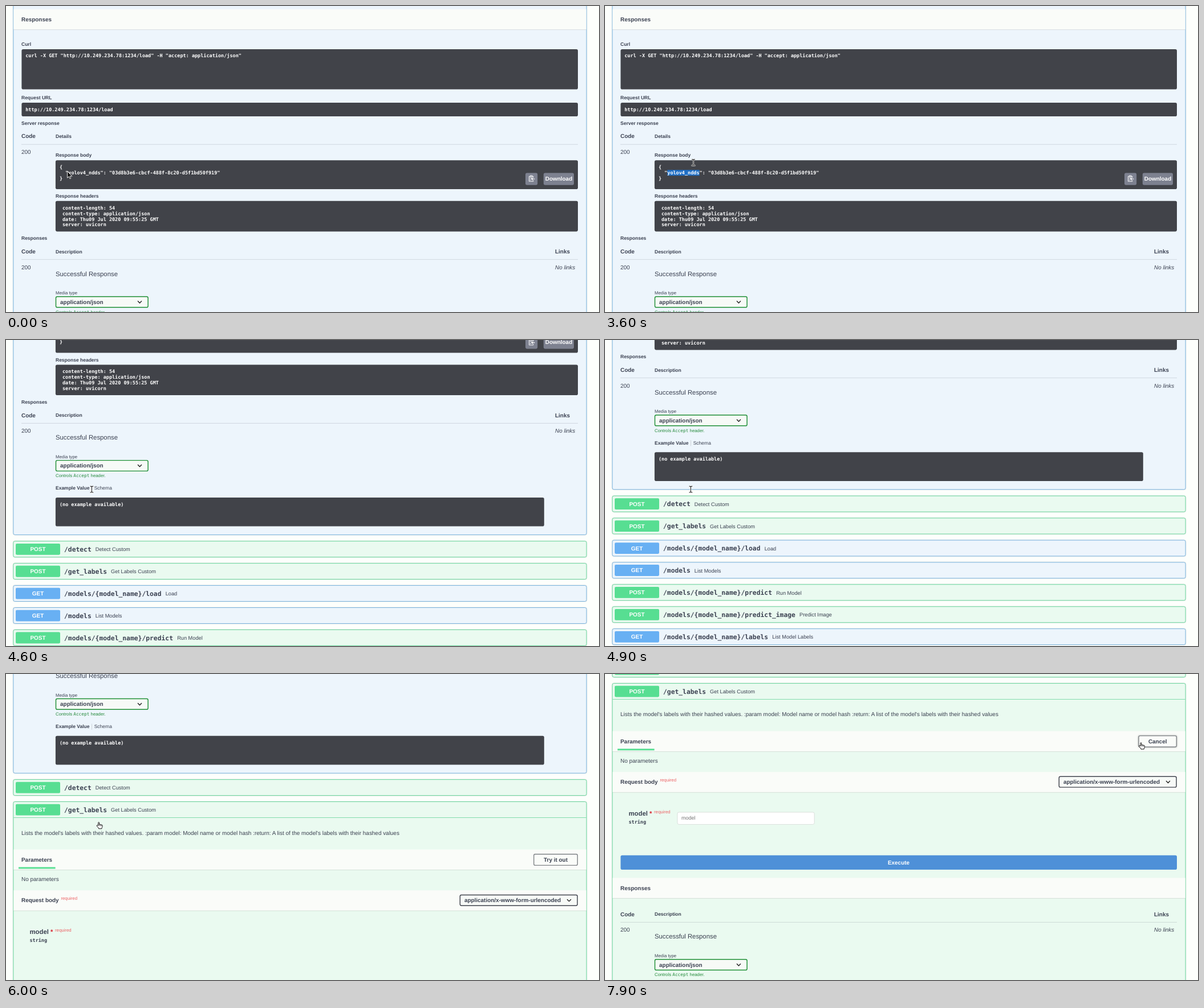
An HTML page that plays this animation: 1040x538 px, repeating every 8000 ms.

```html
<!DOCTYPE html>
<html lang="en">
<head>
<meta charset="utf-8">
<title>API docs</title>
<style>
html, body { margin: 0; width: 100%; height: 100%; overflow: hidden; background: #fdfffc; }
svg { display: block; width: 1040px; height: 538px; }
text { font-family: "Liberation Sans", Arial, sans-serif; fill: #3b4151; text-rendering: geometricPrecision; white-space: pre; }
.b { font-weight: 700; }
.i { font-style: italic; }
.m { font-family: "DejaVu Sans Mono", monospace; font-weight: 700; }
.thin { font-weight: 400; }
.w { fill: #fff; }
.g { fill: #24893a; }
.r { fill: #ec6265; }
.mid { text-anchor: middle; }
.lift { filter: drop-shadow(0 0 1.6px rgba(0,0,0,.35)); }
</style>
</head>
<body>
<svg id="stage" viewBox="0 0 1040 538"></svg>
<script>
const LOOP = 8000, STEP = 100;
const S = 8.51, M = 9.93, L = 11.34;      // text sizes
const ADV = S * 0.602;                     // width of one code character
const DARK = '#414349', INK = '#41444e';
const GET = { name: 'GET', solid: '#68b0f3', line: '#78b3de', fill: '#edf5fc' };
const POST = { name: 'POST', solid: '#57de92', line: '#68d59c', fill: '#eafaf0' };

const text = (x, y, size, cls, str) =>
  `<text x="${x}" y="${y}" font-size="${size}" class="${cls}">${str}</text>`;
const rect = (x, y, x2, y2, fill, r = 0, extra = '') =>
  `<rect x="${x}" y="${y}" width="${x2 - x}" height="${y2 - y}" rx="${r}" fill="${fill}" ${extra}/>`;
const group = (id, body, extra = '') => `<g id="${id}" ${extra}>${body}</g>`;
const path = (d, stroke, width, fill = 'none') =>
  `<path d="${d}" fill="${fill}" stroke="${stroke}" stroke-width="${width}" stroke-linejoin="round" stroke-linecap="round"/>`;
const code = (x, y, x2, y2) => rect(x, y, x2, y2, DARK, 2.8);
const label = (x, y, str) => text(x, y, S, 'b', str);
const title = (x, y, str) => text(x, y, M, 'b', str);
const mono = (x, y, str) => text(x, y, S, 'm w', str);
const rule = y => rect(27, y - 0.35, 1003, y + 0.4, 'rgba(59,65,81,.22)');

const block = (kind, y, y2) =>
  rect(12.9, y, 1018.1, y2, 'none', 2.8, 'stroke="#000" stroke-opacity=".07" stroke-width="2.6"') +
  rect(12.9, y, 1018.1, y2, kind.fill, 2.8, `stroke="${kind.line}" stroke-width="1"`);

const band = y =>
  rect(13.4, y, 1017.6, y + 35.7, '#fafcf9') +
  rect(13.4, y + 35.5, 1017.6, y + 36.4, 'rgba(0,0,0,.12)');

const button = (x, y, x2, str, cls = '') =>
  `<g class="${cls}">${rect(x, y, x2, y + 19.6, '#fafcf9', 2.4, 'stroke="#808488" stroke-width="1.4"')}</g>` +
  text((x + x2) / 2, y + 13.4, M, 'b mid', str);

const select = (x, y, x2, str, color) =>
  rect(x + 0.7, y + 0.7, x2 - 0.7, y + 19.5, '#f7faf7', 2.4, `stroke="${color}" stroke-width="1.45"`) +
  title(x + 8.3, y + 13.6, str) +
  path(`M${x2 - 18.4} ${y + 8.7} l3.1 3.2 l3.1 -3.2`, '#222', 1.4);

function row(kind, y, route, note, height = 28) {
  const noteX = 102 + route.length * L * 0.602 + 7;
  return block(kind, y, y + height) +
    rect(17, y + 4.2, 95, y + 24, kind.solid, 2.1) +
    text(56, y + 17.6, M, 'b w mid', kind.name) +
    text(102, y + 18.2, L, 'm', route) +
    text(noteX, y + 17.7, 9.22, '', note);
}

// Table of documented responses; y is the baseline of its heading
const responseTable = y =>
  title(27, y, 'Code') + label(87, y - 0.5, 'Description') + title(963, y, 'Links') +
  rule(y + 10.7) +
  text(27, y + 27.5, M, '', '200') + text(963, y + 27.5, M, 'i', 'No links') +
  text(87, y + 39.6, L, '', 'Successful Response') +
  text(87, y + 72, 7.8, '', 'Media type') +
  select(86.8, y + 75.3, 249.8, 'application/json', '#1f8f35') +
  text(87, y + 105.7, 7.8, 'g', 'Controls <tspan class="m thin g">Accept</tspan> header.');

const clipboardIcon =
  path('M920 299.5h-2.6v8.8h7.4v-1.6 M924.8 301.5v-2h-2.4 M919.4 299.8v-1.6h3.6v1.6z M918.8 302.4h3 M918.8 305.8h1.8', '#fff', 0.95) +
  path('M927 304h-5 M923.6 302.2l-1.8 1.8l1.8 1.8', '#fff', 1.1);

const loadBlock =
  block(GET, -60, 641.8) + band(5.7) + title(27, 27, 'Responses') +
  label(27, 70.3, 'Curl') + code(27.4, 76, 1003, 146.6) +
  mono(34.2, 90, 'curl -X GET "http://10.249.234.78:1234/load" -H "accept: application/json"') +
  label(27, 164.4, 'Request URL') + code(27.4, 170, 1003, 194) +
  mono(34.2, 185, 'http://10.249.234.78:1234/load') +
  label(27, 208.8, 'Server response') +
  title(27, 232.3, 'Code') + label(87, 231.7, 'Details') + rule(243.2) +
  text(27, 260, M, '', '200') + label(87, 265.4, 'Response body') +
  code(86.9, 271.2, 1003, 322) +
  '<rect id="selection" x="109.3" y="288.2" width="0" height="10" fill="#1f6fc6"/>' +
  mono(93.9, 286, '{') +
  mono(93.9 + 2 * ADV, 296, '"yolov4_ndds": "03d8b3e6-cbcf-488f-8c20-d5f1bd50f919"') +
  mono(93.9, 305.8, '}') +
  rect(911, 293.6, 932.2, 314.8, '#7d8190', 2.8) + clipboardIcon +
  rect(942.8, 293.6, 996, 314.8, '#7d8190', 2.8) + text(969.5, 306.8, M, 'b w mid', 'Download') +
  label(87, 337, 'Response headers') + code(86.9, 342.8, 1003, 396.4) +
  ['content-length: 54', 'content-type: application/json',
   'date: Thu09 Jul 2020 09:55:25 GMT', 'server: uvicorn']
    .map((s, i) => mono(99, 357.6 + i * 9.95, s)).join('') +
  label(27, 411.4, 'Responses') + responseTable(435) +
  label(87, 562.8, 'Example Value') + rect(150.2, 555, 151, 565.5, '#c9ced3') +
  text(154.7, 562.8, S, '', 'Schema') +
  code(86.9, 576.3, 943.8, 627) + mono(93.9, 591, '(no example available)');

const rowY = i => 653.1 + i * 38.93;
const laterRows = [
  [POST, '/get_labels', 'Get Labels Custom'],
  [GET, '/models/{model_name}/load', 'Load'],
  [GET, '/models', 'List Models'],
  [POST, '/models/{model_name}/predict', 'Run Model'],
  [POST, '/models/{model_name}/predict_image', 'Predict Image'],
  [GET, '/models/{model_name}/labels', 'List Model Labels'],
  [GET, '/models/{model_name}/config', 'List Model Config'],
].map(([kind, route, note], i) => row(kind, rowY(i + 1), route, note)).join('');

// The opened operation, measured from its own top edge
const panelBody =
  row(POST, 0, '/get_labels', 'Get Labels Custom', 900) +
  rect(13.4, 27.6, 1017.6, 28.4, POST.line) +
  text(27, 58, M, '', "Lists the model's labels with their hashed values. :param model: Model name or model hash :return: A list of the model's labels with their hashed values") +
  band(84) + title(27, 105.4, 'Parameters') + rect(22, 115, 86.6, 117.9, POST.solid) +
  group('tryOut', button(925.7, 92.2, 1002.3, 'Try it out')) +
  text(27, 139.6, M, '', 'No parameters') +
  band(155.8) + title(27, 176.8, 'Request body') + text(96.4, 172.6, 7.8, 'r', 'required') +
  select(795.6, 163.2, 1002.8, 'application/x-www-form-urlencoded', INK) +
  text(41.5, 232.7, L, 'b', 'model') +
  '<text x="78" y="232.7" font-size="11.34" class="b" style="fill:#d8202c">*</text>' +
  text(86, 228.6, 7.8, 'r', 'required') + text(41.4, 246.8, S, 'm', 'string') +
  group('editing',
    button(936, 92.2, 1002.3, 'Cancel', 'lift') +
    rect(127, 226.6, 367.2, 248, '#fff', 2.8, 'stroke="#d3d9d5" stroke-width=".8"') +
    text(134, 240, 9, '', '<tspan fill="#757575">model</tspan>') +
    rect(27.4, 302.3, 1003, 327.6, '#4e90d8', 2.8) +
    text(515, 318.5, M, 'b w mid', 'Execute')) +
  group('lower', band(316.2) + title(27, 337.5, 'Responses') + responseTable(383.5));

const menuItem = (dy, str) => text(167, 305 + dy, M, '', str);
const menu =
  rect(151, 289.5, 420, 418, '#fff', 1.5, 'class="lift"') +
  rect(151.5, 290.5, 419.5, 313, '#e6e8ea', 0, 'id="menuHover"') +
  menuItem(0, 'Copy') + text(380, 305, M, '', 'Ctrl+C') +
  menuItem(27, 'Search the web for “yolov4_ndds”') +
  rect(151, 346, 420, 346.8, '#dcdfe2') + menuItem(62, 'Print…') +
  text(380, 367, M, '', 'Ctrl+P') +
  rect(151, 381, 420, 381.8, '#dcdfe2') + menuItem(97, 'Inspect');

const cursors =
  group('arrow', path('M0 0V11.2L2.6 8.8L4.4 12.7L6.2 11.9L4.5 8.1H8Z', '#fff', 0.9, '#111')) +
  group('pointer', path('M0 0V10.8L2.5 8.6L4.2 12.5L6 11.7L4.4 7.9H7.8Z', '#111', 0.95, '#fff')) +
  group('beam',
    path('M-2.4 -5.4Q0 -5.4 0 -4V4Q0 5.4 -2.4 5.4M2.4 -5.4Q0 -5.4 0 -4M0 4Q0 5.4 2.4 5.4', '#fff', 2.4) +
    path('M-2.4 -5.4Q0 -5.4 0 -4V4Q0 5.4 -2.4 5.4M2.4 -5.4Q0 -5.4 0 -4M0 4Q0 5.4 2.4 5.4', '#222', 1.1)) +
  group('hand', path('M-.9 6V.8Q0 -.6 .9 .8V4.2Q2 3.5 2.7 4.4Q3.8 3.8 4.5 4.8Q6 4.4 6.3 5.8V8Q6.2 9.6 5.3 10.4V11.6H-.1V10.6L-3.5 6.8Q-3.7 5.3 -2.3 5.3Z', '#111', 1, '#fff') +
    path('M1 4.4V6.4M2.8 4.8V6.6M4.6 5.2V6.8', '#111', 0.7));

document.getElementById('stage').innerHTML =
  group('page',
    loadBlock + row(POST, rowY(0), '/detect', 'Detect Custom') +
    group('later', laterRows) +
    group('panel', panelBody, `transform="translate(0 ${rowY(1)})"`)) +
  group('menu', menu) + cursors;

const el = id => document.getElementById(id);
const show = (id, on) => { el(id).style.display = on ? '' : 'none'; };

// Linear interpolation through [time, ...values] keys
function track(keys, t) {
  const next = keys.findIndex(k => k[0] > t);
  if (next === 0) return keys[0].slice(1);
  if (next < 0) return keys[keys.length - 1].slice(1);
  const a = keys[next - 1], b = keys[next], p = (t - a[0]) / (b[0] - a[0]);
  return a.slice(1).map((v, i) => v + (b[i + 1] - v) * p);
}

const scrollKeys = [[3900, 0], [4000, 19], [4200, 75], [4400, 188], [4600, 299.4],
  [4800, 354], [5000, 404], [5200, 444.7], [5300, 451], [5900, 451],
  [6100, 484], [6500, 563], [6700, 563], [7000, 608], [7400, 675.6]];

const mouseKeys = [[0, 107.6, 291], [100, 109, 292], [200, 110.3, 293.5], [400, 110.3, 293.5],
  [500, 109.8, 293.5], [900, 109.8, 293.5], [1800, 163.5, 294], [1900, 164.5, 294],
  [2200, 164.5, 294], [2300, 159.3, 294.5], [2400, 155, 294.5], [2500, 155, 294.5],
  [2600, 151, 294], [2800, 152, 294], [3100, 165, 299], [3500, 165, 299], [3600, 155, 275],
  [3700, 150.4, 262.5], [5400, 150.4, 262.5], [5500, 151, 258], [5700, 154, 258.5],
  [5900, 154, 258.5], [6200, 180, 264], [6500, 243.4, 272], [6700, 290, 272],
  [7100, 760, 160], [7400, 930, 122], [7500, 930, 122], [7600, 937, 121], [7900, 940, 120.5]];

function cursorAt(t) {
  if (t < 100) return 'arrow';
  if (t < 2600) return 'beam';
  if (t < 3600) return 'arrow';
  if (t < 5500) return 'beam';
  if (t < 6100) return 'hand';
  return t < 7500 ? 'pointer' : 'hand';
}

function draw(t) {
  const [scroll] = track(scrollKeys, t), [x, y] = track(mouseKeys, t);
  el('page').setAttribute('transform', `translate(0 ${-scroll})`);

  const chars = t < 1000 ? 0 : t >= 1900 ? 11 : Math.max(0, Math.round((x - 109.3) / ADV));
  el('selection').setAttribute('width', chars * ADV);

  show('menu', t >= 2600 && t < 3300);
  el('menu').style.opacity = t < 2700 ? 0.6 : 1;
  show('menuHover', t >= 2900);

  const opened = t >= 5900, editing = t >= 7600;
  show('later', !opened);
  show('panel', opened);
  show('tryOut', !editing);
  show('editing', editing);
  el('lower').setAttribute('transform', `translate(0 ${editing ? 25.8 : 0})`);

  const current = cursorAt(t);
  for (const id of ['arrow', 'pointer', 'beam', 'hand']) show(id, id === current);
  el(current).setAttribute('transform', `translate(${x} ${y})`);
}

const start = performance.now();
function tick() {
  const t = (performance.now() - start) % LOOP;
  draw(Math.floor(t / STEP) * STEP);
  requestAnimationFrame(tick);
}
tick();
</script>
</body>
</html>
```
